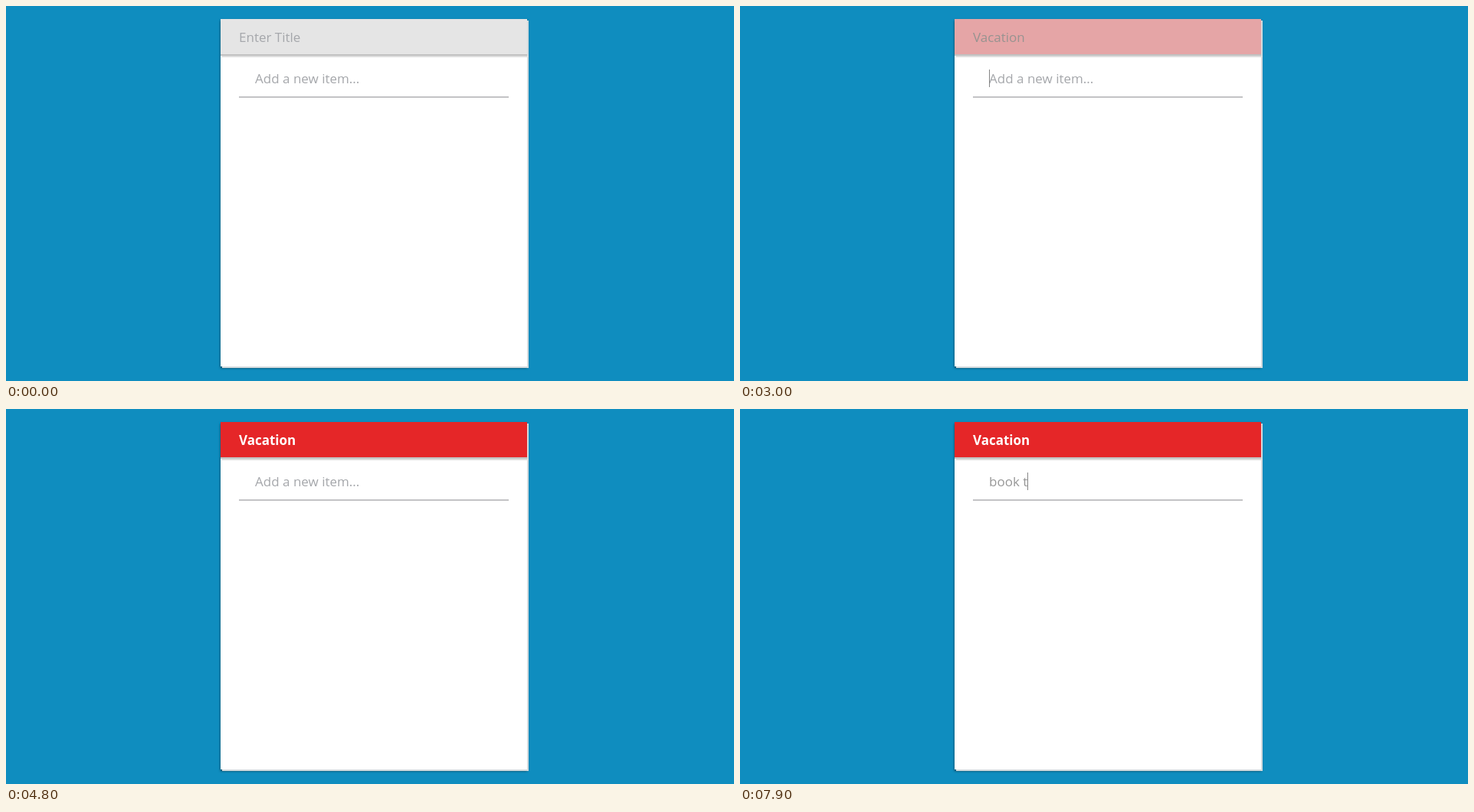
Write an HTML page with a canvas that moves like this. It is 950 by 490 pixels and loops after 8 s.

```html
<!DOCTYPE html>
<html lang="en">
<head>
<meta charset="utf-8">
<title>List card</title>
<style>
  html, body { margin: 0; width: 100%; height: 100%; overflow: hidden; background: #0f8dbf; }
  canvas { display: block; }
</style>
</head>
<body>
<canvas id="stage" width="950" height="490"></canvas>
<script>
const ctx = document.getElementById('stage').getContext('2d');
const LOOP = 8000, STEP = 100, BLINK = 530, FADE = 300;

const title = {
  x: 304, baseline: 47, hint: 'Enter Title', text: 'Vacation',
  focus: 900, blur: 2900,
  keys: [1600, 1700, 1800, 2000, 2200, 2300, 2500, 2600]
};
const item = {
  x: 325, baseline: 101, hint: 'Add a new item...', text: 'book t',
  focus: 2900, blur: Infinity,
  keys: [6600, 6900, 7000, 7200, 7500, 7800]
};

function rect(x, y, w, h, color) {
  ctx.fillStyle = color;
  ctx.fillRect(x, y, w, h);
}

function mix(a, b, p) {
  return `rgb(${a.map((v, i) => Math.round(v + (b[i] - v) * p))})`;
}

function drawField(field, t, color = '#979797', weight = 400) {
  const pressed = field.keys.filter(k => k <= t);
  const typed = field.text.slice(0, pressed.length);
  ctx.font = `${weight} 17px "Open Sans", sans-serif`;
  ctx.fillStyle = typed ? color : '#a5a7ab';
  ctx.fillText(typed || field.hint, field.x, field.baseline);

  // The caret stays lit after each key, then blinks
  const since = t - (pressed.at(-1) ?? field.focus);
  const focused = t >= field.focus && t < field.blur;
  if (focused && Math.floor(since / BLINK) % 2 === 0) {
    const x = Math.floor(field.x + ctx.measureText(typed).width);
    rect(x, field.baseline - 18, 1, 23, '#858585');
  }
}

function drawCard(fade) {
  ctx.save();
  ctx.shadowColor = 'rgba(0,0,0,.6)';
  ctx.shadowBlur = 3;
  ctx.shadowOffsetY = 2;
  rect(280, 17, 400, 454, '#fff');
  ctx.restore();
  rect(680, 19, 2, 454, '#d3dadd');
  rect(282, 471, 400, 2, '#d3dadd');

  rect(282, 65, 400, 2, '#dedede');
  rect(280, 17, 400, 46, mix([229, 229, 229], [229, 38, 40], fade));
  rect(280, 63, 400, 2, '#c1c1c1');
  rect(304, 118, 352, 2, '#c3c3c5');
}

function draw(now) {
  const t = Math.floor(now % LOOP / STEP) * STEP;
  const fade = Math.min(1, Math.max(0, (t - title.blur) / FADE));
  const saved = fade > .5;
  rect(0, 0, 950, 490, '#0f8dbf');
  drawCard(fade);
  drawField(title, t, saved ? '#fff' : '#979390', saved ? 700 : 400);
  drawField(item, t);
}

const start = performance.now();
(function tick() {
  draw(performance.now() - start);
  requestAnimationFrame(tick);
})();
</script>
</body>
</html>
```
